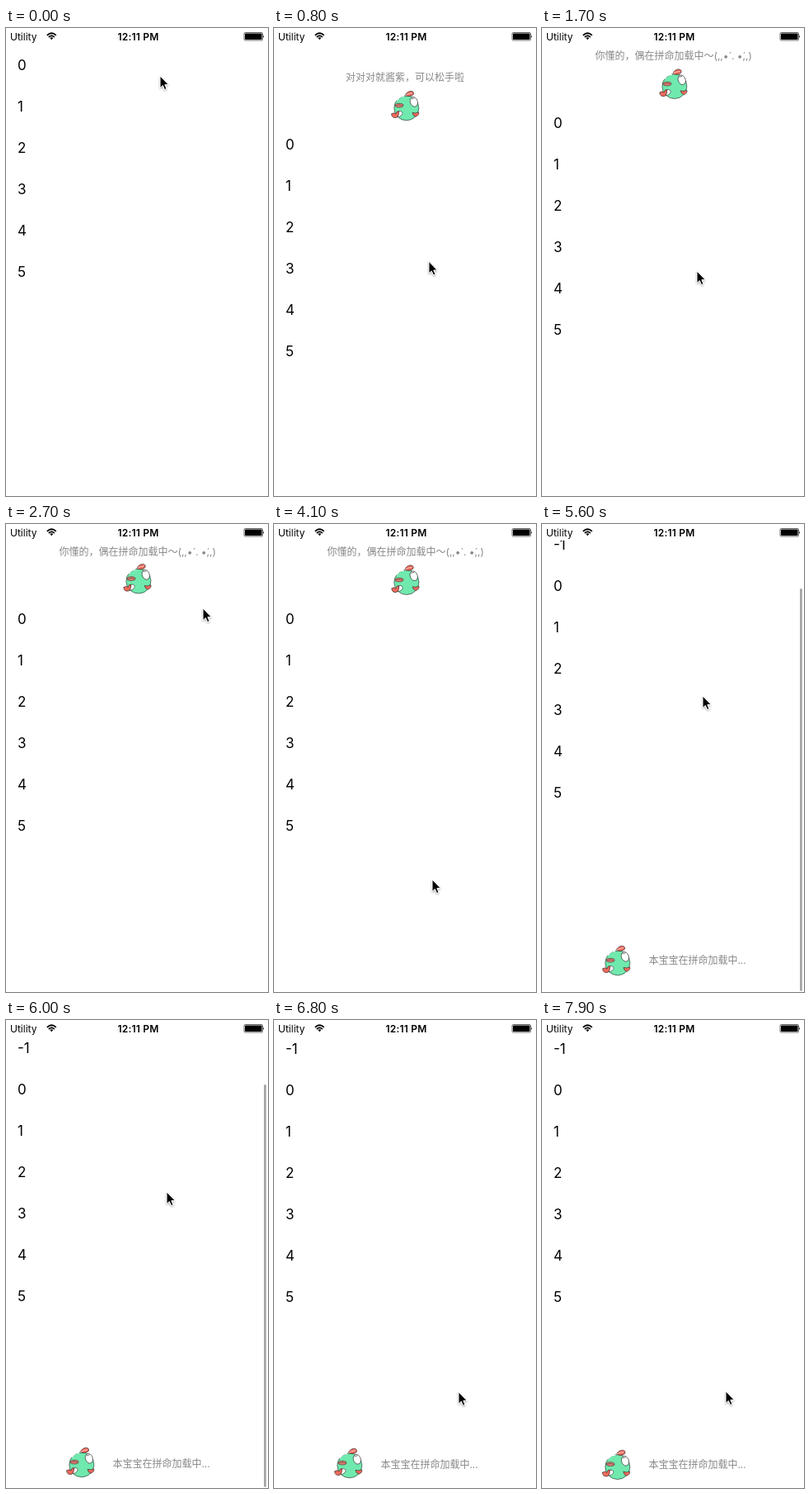
Write an HTML page that moves like this. It is 318x566 px and loops after 8000 ms.

```html
<!DOCTYPE html>
<html lang="zh">
<head>
<meta charset="utf-8">
<title>Pull to refresh</title>
<style>
  html, body { margin: 0; width: 100%; height: 100%; overflow: hidden; background: #fff; }
  svg { display: block; width: 318px; height: 566px; }
  text { font-family: Inter, Roboto, sans-serif; white-space: pre; }
  .rows { font-size: 17px; }
  .hint text { font: 12px "Noto Sans CJK SC", "Noto Sans CJK", "Noto Sans CJK JP", sans-serif; fill: #888; }
  .hint .face { font-family: Inter, "DejaVu Sans", sans-serif; }
  .status { font-size: 12px; }
  .time { font-weight: 600; letter-spacing: .2px; text-anchor: middle; }
</style>
</head>
<body>
<svg viewBox="0 0 318 566">
  <defs>
    <g id="fish" stroke="#222" stroke-width=".6" stroke-linejoin="round">
      <ellipse cx=".8" cy="2" rx="15" ry="15" fill="#70e9ae"/>
      <path d="M-1-13Q1-18 6-18.500Q11-18 9-14Q5-11-1-13Z" fill="#ef6a5c"/>
      <path d="M-1-13Q3-16 8-16" fill="none" stroke="#fff"/>
      <path d="M-11-7Q-7-13-2-12" fill="none" stroke="#fff" stroke-width="1.200"/>
      <ellipse cx="9.800" cy="-5.500" rx="4.400" ry="6" transform="rotate(-20 9.800 -5.500)" fill="#fff"/>
      <path d="M6.500-9l4-1" fill="none"/>
      <ellipse cx="-8" cy="-1.200" rx="5" ry="2.300" fill="#f4877a"/>
      <path d="M-12-1Q-8-2.500-4-1" fill="none"/>
      <path d="M-9 6Q-4 5-4 9Q-6 13-10 13Z" fill="#fff"/>
      <path d="M-17.500 9Q-14 7-12 9Q-11 5-8.500 6Q-8 11-11 13.500Q-17 15-17.500 9Z" fill="#ef6a5c"/>
      <path d="M8 7.500Q12 9 15.500 7Q17 10 12 12.500Q8 11 8 7.500Z" fill="#ef6a5c"/>
    </g>
    <clipPath id="list"><path d="M0 20H318V566H0Z"/></clipPath>
    <filter id="shade" x="-50%" y="-50%" width="200%" height="200%">
      <feDropShadow dx="0" dy="1" stdDeviation=".9" flood-opacity=".4"/>
    </filter>
  </defs>

  <g clip-path="url(#list)">
    <g id="rows" class="rows"></g>
    <g id="header" class="hint">
      <text id="pull" x="87" y="-32.500">对对对就酱紫，可以松手啦</text>
      <g id="loading">
        <text x="64.500" y="-32.500">你懂的，偶在拼命加载中～</text>
        <text class="face" x="208.500" y="-32.500">(,,•̀ . •́,,)</text>
      </g>
      <use id="headerFish" href="#fish"/>
    </g>
    <g id="footer" class="hint">
      <text x="129.500" y="602">本宝宝在拼命加载中...</text>
      <use id="footerFish" href="#fish"/>
    </g>
    <rect id="bar" x="313" y="78" width="2.800" height="487" rx="1.400" fill="#a6a6a6"/>
  </g>

  <g class="status">
    <text x="5" y="14.500">Utility</text>
    <g fill="none" stroke="#000" stroke-width="1.700">
      <path d="M49.800 8.800Q55.300 3.700 60.800 8.800M51.800 11Q55.300 7.800 58.800 11"/>
      <path d="M53.300 12Q55.300 10.400 57.300 12L55.300 14.200Z" fill="#000" stroke="none"/>
    </g>
    <text class="time" x="160.500" y="14.500">12:11 PM</text>
    <rect x="289" y="5.500" width="22.500" height="9.500" rx="1.500" fill="none" stroke="#000" stroke-width=".6"/>
    <rect x="290" y="6.500" width="20.500" height="7.500" rx=".8"/>
    <path d="M312.200 8.600q1.700 1.600 0 3.400Z"/>
  </g>

  <path id="cursor" d="M0 0V14.500L3.300 11.500L5.600 16.600L8 15.500L5.800 10.600H10.300Z"
        stroke="#fff" stroke-width="1" filter="url(#shade)"/>
</svg>
<script>
const LOOP = 8000, STEP = 100;
const RELEASE = 1000, RELOADED = 4400, LOAD_MORE = 5400;
const HEADER = 70, FOOTER = 60, VIEW = 546;

// Pointer strokes, each easing out from where the last one ended.
const pointerStart = { x: 187, y: 58 };
const strokes = [
  { from: 100, to: 1000, x: 188, y: 294 },
  { from: 1900, to: 2700, x: 239, y: 102 },
  { from: 2800, to: 4100, x: 192, y: 430 },
  { from: 4100, to: 4400, x: 186, y: 438 },
  { from: 4800, to: 5400, x: 195, y: 208 },
  { from: 6000, to: 6300, x: 228, y: 453 },
  { from: 6300, to: 7200, x: 223, y: 449 }
];
// Heights at which the two drags take hold of the list.
const GRAB_DOWN = 70, GRAB_UP = 417;

const el = id => document.getElementById(id);
const clamp = v => Math.min(1, Math.max(0, v));
const easeOut = p => 1 - (1 - p) ** 2;
const easeInOut = p => p * p * (3 - 2 * p);
const move = (id, x, y, extra = "") => el(id).setAttribute("transform", `translate(${x} ${y}) ${extra}`);
const show = (node, visible) => { node.style.display = visible ? "" : "none"; };

function pointerAt(t) {
  return strokes.reduce((at, { from, to, x, y }) => {
    const linear = clamp((t - from) / (to - from));
    const p = from === 4800 ? easeInOut(linear) : easeOut(linear);
    return { x: at.x + (x - at.x) * p, y: at.y + (y - at.y) * p };
  }, pointerStart);
}

// Resistance of a list pulled past its edge, and its spring back.
const rubber = d => VIEW * (1 - 1 / (1 + 0.55 * Math.max(0, d) / VIEW));
const settle = (start, end, dt) => end + (start - end) * Math.exp(-dt / 160);

const pullDown = t => rubber(pointerAt(t).y - GRAB_DOWN);
const pullUp = t => -rubber(GRAB_UP - pointerAt(t).y);

function scrollAt(t) {
  if (t < RELEASE) return pullDown(t);
  if (t < RELOADED) return settle(pullDown(RELEASE), HEADER, t - RELEASE);
  if (t < LOAD_MORE) return pullUp(t);
  return settle(pullUp(LOAD_MORE), -FOOTER, t - LOAD_MORE);
}

const newRows = [];
for (let n = -2; n <= 5; n++) {
  const row = document.createElementNS("http://www.w3.org/2000/svg", "text");
  row.setAttribute("x", 14);
  row.setAttribute("y", 51 + n * 50);
  row.textContent = n;
  el("rows").append(row);
  if (n < 0) newRows.push(row);
}

function draw(t) {
  const scroll = Math.round(scrollAt(t));
  const pointer = pointerAt(t);
  const reloaded = t >= RELOADED;
  const phase = 2 * Math.PI * t / 800;
  const bob = 0.3 + Math.cos(phase);
  const tilt = `rotate(${-2 * Math.sin(phase)})`;

  move("rows", 0, scroll + (reloaded ? 100 : 0));
  newRows.forEach(row => show(row, reloaded));

  move("header", 0, scroll);
  show(el("header"), !reloaded);
  show(el("pull"), t <= RELEASE);
  show(el("loading"), t > RELEASE);
  move("headerFish", 160, bob - 2.5, tilt);

  move("footer", 0, scroll);
  show(el("footer"), t > LOAD_MORE);
  move("footerFish", 91, 597.5 + bob, tilt);

  el("bar").style.opacity = t > LOAD_MORE ? 1 - clamp((t - 6000) / 300) : 0;
  move("cursor", pointer.x, pointer.y);
}

const start = performance.now();
function tick() {
  const t = (performance.now() - start) % LOOP;
  draw(Math.floor(t / STEP) * STEP);
  requestAnimationFrame(tick);
}
tick();
</script>
</body>
</html>
```
